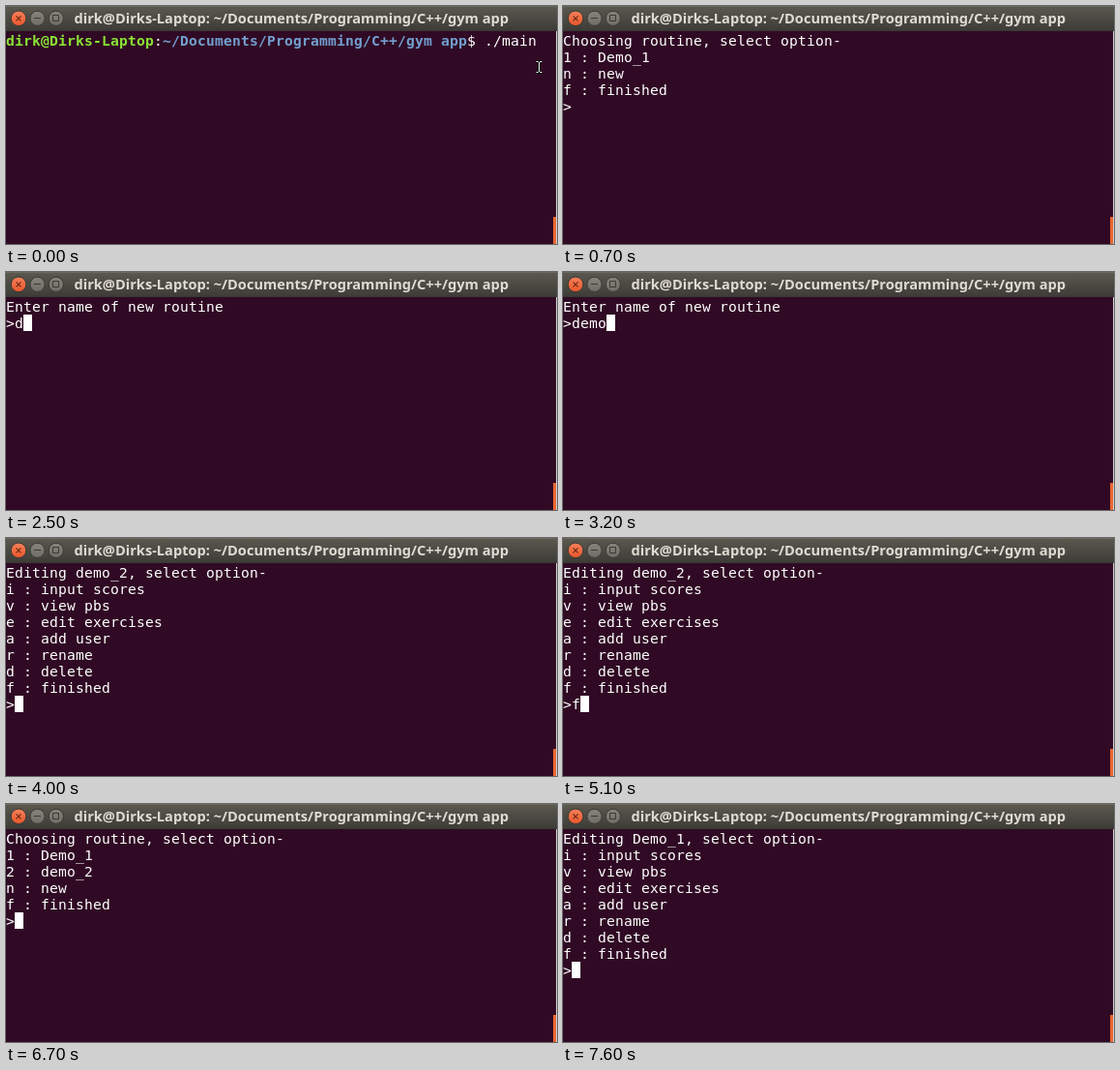
An HTML page that plays this animation: 570x246 px, repeating every 8000 ms.

```html
<!DOCTYPE html>
<html lang="en">
<head>
<meta charset="utf-8">
<title>Terminal</title>
<style>
  html, body { margin: 0; width: 100%; height: 100%; overflow: hidden; background: #300a24; }
  #stage { position: relative; width: 570px; height: 246px; overflow: hidden; background: #300a24; }
  #bar, #pointer { position: absolute; left: 0; top: 0; }
  #bar text { font: bold 14.6px "Noto Sans", "Open Sans", sans-serif; fill: #dfdbd2; }
  #screen {
    position: absolute; left: 0; top: 27px; margin: 0; color: #fff; white-space: pre;
    font: 14.667px/17px "DejaVu Sans Mono", monospace;
    letter-spacing: calc(9px - 1ch); /* snap glyphs to the 9px cell grid */
  }
  #screen b { font-weight: bold; }
  .user { color: #8ae234; }
  .path { color: #729fcf; }
  #cursor { position: absolute; width: 9px; height: 17px; background: #fff; }
  #thumb { position: absolute; left: 566px; top: 218px; width: 3px; height: 28px; background: #e9652f; }
  #edge { position: absolute; left: 569px; top: 26px; width: 1px; height: 220px; background: #d0cccb; }
</style>
</head>
<body>
<div id="stage">
  <svg id="bar" width="570" height="27" viewBox="0 0 570 27">
    <defs>
      <linearGradient id="metal" x2="0" y2="1">
        <stop offset="0" stop-color="#5b594f"/>
        <stop offset="1" stop-color="#3c3b37"/>
      </linearGradient>
      <linearGradient id="red" x2="0" y2="1">
        <stop offset="0" stop-color="#f5805a"/>
        <stop offset="1" stop-color="#e9572b"/>
      </linearGradient>
      <linearGradient id="grey" x2="0" y2="1">
        <stop offset="0" stop-color="#85837a"/>
        <stop offset="1" stop-color="#6f6d65"/>
      </linearGradient>
    </defs>
    <rect width="570" height="26" fill="url(#metal)"/>
    <rect width="570" height="1" fill="#6b695f"/>
    <rect y="25" width="570" height="1" fill="#383732"/>
    <g stroke="#3a3934">
      <circle cx="13" cy="12.8" r="7.8" fill="url(#red)"/>
      <circle cx="32.5" cy="12.8" r="7.6" fill="url(#grey)"/>
      <circle cx="51.8" cy="12.8" r="7.6" fill="url(#grey)"/>
      <path d="M10.5 10.3l5 5m0-5l-5 5" stroke-width="1.2" stroke="#6b2a14"/>
      <path d="M29 12.5h7M48.5 9.5h6v6h-6z" fill="none"/>
    </g>
    <text x="70.5" y="18">dirk@Dirks-Laptop: ~/Documents/Programming/C++/gym app</text>
  </svg>
  <pre id="screen"></pre>
  <div id="cursor"></div>
  <div id="thumb"></div>
  <div id="edge"></div>
  <svg id="pointer" width="570" height="246" viewBox="0 0 570 246" fill="none">
    <defs><path id="beam" d="M548.5 57.5h2l1 1 1-1h2M551.5 58v10M548.5 68.5h2l1-1 1 1h2"/></defs>
    <use href="#beam" stroke="#000" stroke-width="3"/>
    <use href="#beam" stroke="#fff"/>
  </svg>
</div>
<script>
const LOOP = 8000, CELL_W = 9, CELL_H = 17, TOP = 27;
const $ = id => document.getElementById(id);

const shell = '<b class="user">dirk@Dirks-Laptop</b>:' +
  '<b class="path">~/Documents/Programming/C++/gym app</b>$ ./main';
const menu = (title, ...items) => [title + ', select option-', ...items, '>'].join('\n');
const choose = (...routines) => menu('Choosing routine',
  ...routines.map((name, i) => `${i + 1} : ${name}`), 'n : new', 'f : finished');
const edit = name => menu('Editing ' + name, 'i : input scores', 'v : view pbs',
  'e : edit exercises', 'a : add user', 'r : rename', 'd : delete', 'f : finished');

const first = choose('Demo_1');
const ask = 'Enter name of new routine\n>';
const editNew = edit('demo_2');
const second = choose('Demo_1', 'demo_2');

// start time, text, cursor visible
const steps = [
  [0, shell, false], [100, shell, true],
  [200, first, true], [700, first, false], [900, first + 'n', true],
  [1500, ask, true], [2100, ask, false],
  [2500, ask + 'd', true], [2700, ask + 'de', true], [3000, ask + 'dem', true],
  [3200, ask + 'demo', true], [3700, ask + 'demo_', true], [3800, ask + 'demo_2', true],
  [4000, editNew, true], [4600, editNew, false], [5000, editNew, true], [5100, editNew + 'f', true],
  [5600, second, true], [6100, second, false], [6700, second, true], [7200, second + '1', true],
  [7600, edit('Demo_1'), true]
];

let shown;
function show(step) {
  if (step === shown) return;
  shown = step;
  const [time, text, lit] = step;
  $('screen').innerHTML = text;
  const lines = $('screen').textContent.split('\n');
  const cursor = $('cursor').style;
  cursor.left = lines[lines.length - 1].length * CELL_W + 'px';
  cursor.top = TOP + (lines.length - 1) * CELL_H + 'px';
  cursor.visibility = lit ? 'visible' : 'hidden';
  $('pointer').style.visibility = time < 100 ? 'visible' : 'hidden';
}

const start = performance.now();
function tick() {
  const t = (performance.now() - start) % LOOP;
  show(steps.findLast(step => step[0] <= t));
  requestAnimationFrame(tick);
}
tick();
</script>
</body>
</html>
```
